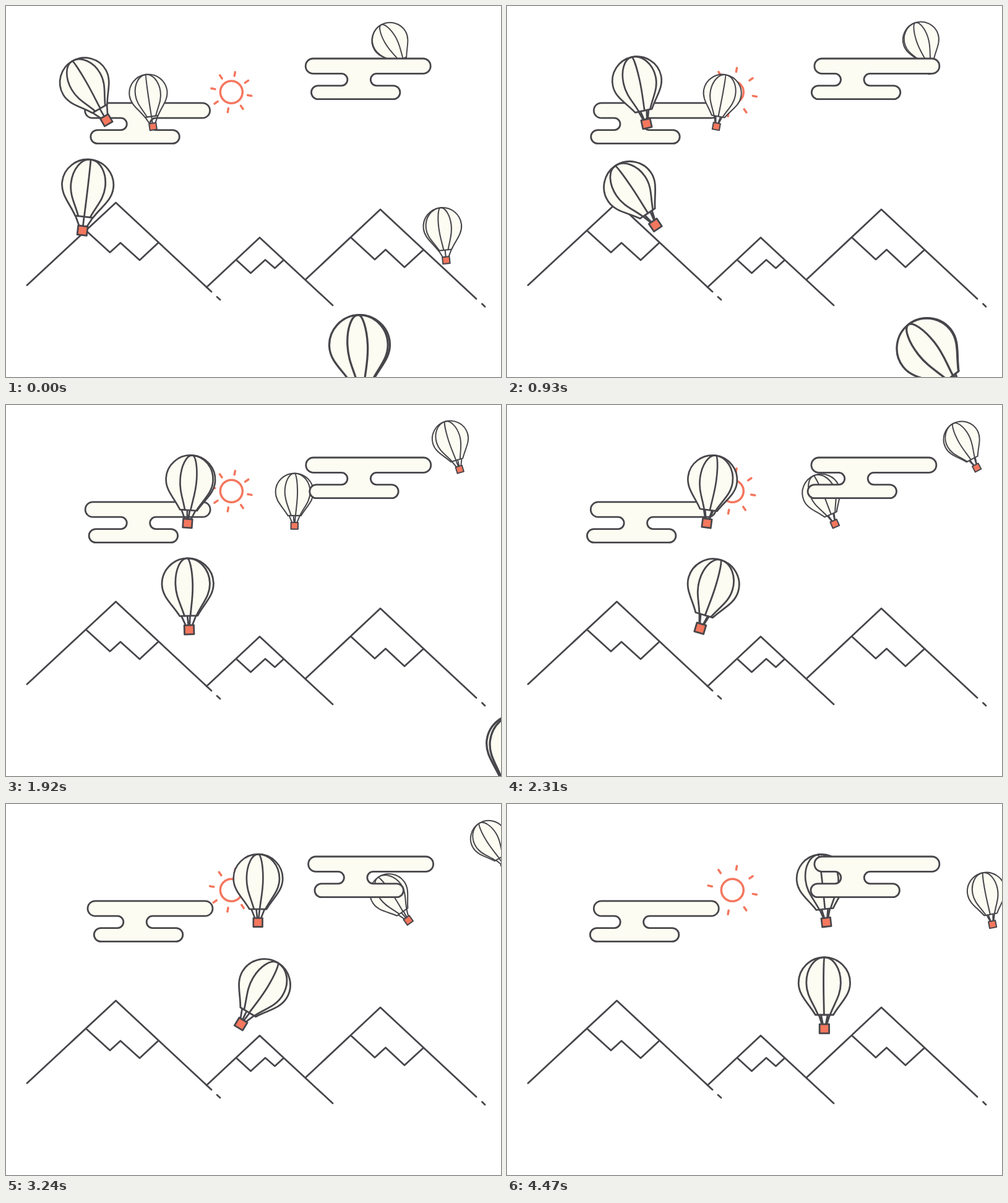
An HTML page that plays this animation: 800x600 px, repeating every 4.5 s.

```html
<!DOCTYPE html>
<html lang="en">
<head>
<meta charset="utf-8">
<title>Balloons over the mountains</title>
<style>
  html, body { margin: 0; width: 100%; height: 100%; overflow: hidden; background: #fff; }
  svg { display: block; width: 100vw; height: 100vh; }
  .line { fill: none; stroke: #47464b; stroke-width: 2.8; stroke-linecap: round; stroke-linejoin: round; }
  .cream { fill: #fcfcf2; }
  .coral { fill: #f4775e; }
  .sun { fill: none; stroke: #f4775e; stroke-width: 3.5; stroke-linecap: round; }
</style>
</head>
<body>
<svg viewBox="0 0 800 600">
  <path class="line" d="M34 451.5L177.5 318L332 462M341 470.5L346 475M324 455L410 374.5L528 484
    M484 442.5L605 329L760 473.5M769.5 481.8L774 486.3
    M129 363L168 398.5L185 383L216 411L246 383
    M372 410.5L395.5 432L419 410.5L434.5 424L448.5 411
    M558 375L596 410L613.5 394L644 422.5L675 394"/>
  <circle class="sun" cx="364.3" cy="139.3" r="18"/>
  <path class="sun" id="rays"/>
  <path class="line cream" id="cloudL"/>
  <g id="balloons"></g>
  <path class="line cream" id="cloudR" transform="translate(356.6 -71.8)"/>
</svg>
<script>
const LOOP = 4500, STEP = 30, TAU = Math.PI * 2, RAD = Math.PI / 180;
const $ = id => document.getElementById(id);
const round = n => Math.round(n * 100) / 100;

// Seconds at which the tilt of every balloon is given, in degrees
const keys = [0, 0.51, 1.35, 1.92, 2.73, 3.75, 4.47];
const balloons = [
  { x: 627.5, y: 68, speed: 49.3, size: 0.7, spin: 0.55, tilt: [-30, -25, -13, -17, -37, -21, -15] },
  { x: 232, y: 155.7, speed: 122, size: 0.735, spin: -0.03, tilt: [-8, -5.7, 22.5, 0, -42, -21, -10.6] },
  { x: 136.5, y: 140, speed: 83.6, size: 0.955, spin: 0.1, tilt: [-30, -15.6, -9.7, 4, 7.3, -7.3, -6.5] },
  { x: 707, y: 371.5, speed: 129, size: 0.74, spin: 0.7, tilt: [-6.3, 22.5, 20, 10, 0, 0, 0] },
  { x: 129.8, y: 309.5, speed: 85.7, size: 1, spin: 0.02, tilt: [6.6, -25, -33.5, -1.8, 30, 24, 0] },
  { x: 572.7, y: 572, speed: 130, size: 1.175, spin: 0.4, tilt: [-3, -31, -35, 8, 10, 0, 0] }
];

function add(parent, tag, cls) {
  const el = document.createElementNS('http://www.w3.org/2000/svg', tag);
  if (cls) el.setAttribute('class', cls);
  return parent.appendChild(el);
}

// One side of the envelope, squeezed to s of its width
const side = s => `M0 -61.6C${round(23 * s)} -61.6 ${round(41.7 * s)} -43 ${round(41.7 * s)} -20.3` +
  `C${round(41.7 * s)} 0 ${round(26 * s)} 12 ${round(14.5 * s)} 31.5`;

for (const b of balloons) {
  b.g = add($('balloons'), 'g');
  b.cords = add(b.g, 'path', 'line');
  add(b.g, 'path', 'line coral').setAttribute('d', 'M-7.7 46.6H7.7V61.4H-7.7Z');
  add(b.g, 'path', 'line cream').setAttribute('d',
    side(1) + 'H-14.5C-26 12 -41.7 0 -41.7 -20.3C-41.7 -43 -23 -61.6 0 -61.6Z');
  b.ribs = add(b.g, 'path', 'line');
}

function slope(v, i) {
  const a = Math.max(i - 1, 0), b = Math.min(i + 1, v.length - 1);
  return (v[b] - v[a]) / (keys[b] - keys[a]);
}

function spline(v, t) {
  let i = 0;
  while (i < keys.length - 2 && t > keys[i + 1]) i++;
  const h = keys[i + 1] - keys[i], u = (t - keys[i]) / h, w = 1 - u;
  return w * w * ((1 + 2 * u) * v[i] + u * h * slope(v, i)) +
    u * u * ((3 - 2 * u) * v[i + 1] - w * h * slope(v, i + 1));
}

function drawBalloon(b, t) {
  const x = b.x + b.speed * t;
  b.g.setAttribute('transform',
    `translate(${round(x)} ${b.y}) rotate(${round(spline(b.tilt, t))}) scale(${b.size})`);

  // Ribs slide evenly across the envelope, two thirds of its half width apart
  let ribs = '', cords = '';
  const slide = (b.spin + t / 0.45 + 1) % 1;
  for (let k = -2; k < 2; k++) {
    const s = (slide + k) * 2 / 3;
    if (Math.abs(s) < 1) ribs += side(s);
  }
  // Front cords move right, back cords left
  const p = t / 0.675 % 1;
  for (const s of [p, p - 1, -p, 1 - p]) {
    cords += `M${round(14 * s)} 31.5L${round(6.5 * s)} 46.5`;
  }
  b.ribs.setAttribute('d', ribs);
  b.cords.setAttribute('d', cords);
}

function cloud(g, neck, low) {
  const x = 127.6 + 12.7 * g, n = 195.4 - 12.5 * neck, b = 135.9 + low;
  return `M${x + 12.2} 156.8H${x + 189.8}a12.2 12.2 0 0 1 0 24.4H${n + 47.1}` +
    `a9.7 9.7 0 0 0 0 19.4H${b + 132.6}a10.9 10.9 0 0 1 0 21.8H${b + 10.9}` +
    `a10.9 10.9 0 0 1 0 -21.8H${n - 9.7}a9.7 9.7 0 0 0 0 -19.4H${x + 12.2}a12.2 12.2 0 0 1 0 -24.4Z`;
}

function rays(g) {
  let d = '';
  for (let k = 0; k < 8; k++) {
    const a = (10.5 + 45 * k) * RAD;
    const at = r => `${round(364.3 + r * Math.sin(a))} ${round(139.3 - r * Math.cos(a))}`;
    d += `M${at(26.7 + 6.8 * g)}L${at(33 + 6.8 * g)}`;
  }
  return d;
}

// Swings from 0 to 1 and back every 1.8 s
const sway = t => (1 - Math.cos(TAU * t / 1.8)) / 2;

function draw(ms) {
  const t = Math.floor((ms % LOOP) / STEP) * STEP / 1000;
  const g = sway(t);
  const low = -6.5 * Math.sin(TAU * (t - 0.04) / 1.8);
  const shape = cloud(g, sway(t - 0.06), low);
  $('cloudL').setAttribute('d', shape);
  $('cloudR').setAttribute('d', shape);
  $('rays').setAttribute('d', rays(g));
  for (const b of balloons) drawBalloon(b, t);
}

const start = performance.now();
function tick() {
  draw(performance.now() - start);
  requestAnimationFrame(tick);
}
tick();
</script>
</body>
</html>
```
